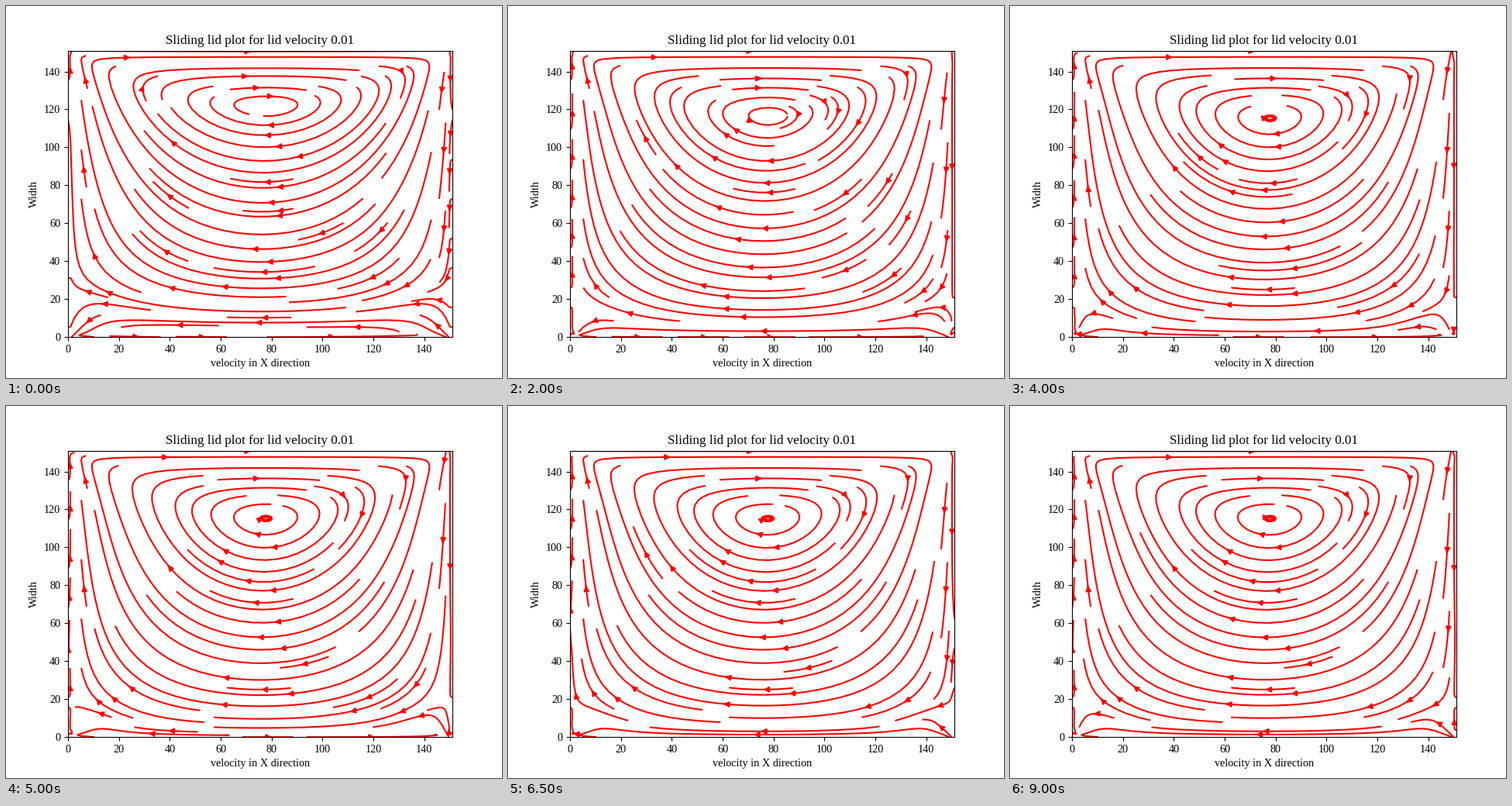
Animation, 640 px wide and 480 px high, one loop 9500 ms. Source, as a matplotlib script:

```python
import numpy as np
import matplotlib.pyplot as plt
from matplotlib.animation import ArtistAnimation

SIZE = 152            # nodes per side, dry wall nodes included
PAD = SIZE + 2        # plus a periodic halo
LID = 0.01            # lid velocity in lattice units
FRAMES, STEPS = 19, 1020
WARM_UP = STEPS       # steps run before the first plotted interval
INTERVAL = 500


def lattice_flow():
    """D2Q9 lattice Boltzmann cavity with omega = 1, yields momentum fields.

    Populations are kept without their weights and as deviations from rest;
    momentum is stored three times its value.
    """
    def alloc(*shape):
        return np.zeros(shape, np.float32)

    edge = PAD + 1
    length = PAD * PAD - 2 * edge

    def shifted(f, dx=0, dy=0):
        start = edge - dx - PAD * dy
        return f.reshape(-1)[start:start + length]

    fields = alloc(5, PAD, PAD)
    moments, vel = fields[:3], fields[1:]
    rho, jx, jy, diag, anti = fields
    base = alloc(PAD, PAD)
    plus, minus = alloc(4, PAD, PAD), alloc(4, PAD, PAD)
    f1, f2, f5, f6 = plus
    f3, f4, f7, f8 = minus

    # Bounce-back: (slot streaming into the fluid, population hitting the wall)
    mid, low, high = slice(2, SIZE), slice(1, SIZE - 1), slice(3, SIZE + 1)
    last = SIZE - 1
    walls = [
        (f3[mid, SIZE], f1[mid, last]),      # right
        (f7[high, SIZE], f5[low, last]),
        (f6[low, SIZE], f8[high, last]),
        (f1[mid, 1], f3[mid, 2]),            # left
        (f5[low, 1], f7[high, 2]),
        (f8[high, 1], f6[low, 2]),
        (f2[1, mid], f4[2, mid]),            # bottom
        (f5[1, low], f7[2, high]),
        (f6[1, high], f8[2, low]),
        (f4[SIZE, mid], f2[last, mid]),      # top
        (f7[SIZE, high], f5[last, low]),
        (f8[SIZE, low], f6[last, high]),
    ]
    lid_back, lid_ahead = f7[SIZE, high], f8[SIZE, low]

    even, odd = alloc(4, length), alloc(4, length)
    dirs = [(1, 0), (0, 1), (1, 1), (-1, 1)]
    pairs = [(shifted(plus[i], dx, dy), shifted(minus[i], -dx, -dy),
              even[i], odd[i]) for i, (dx, dy) in enumerate(dirs)]
    e0, e1, e2, e3 = even
    o0, o1, o2, o3 = odd
    b, r, mx, my = (shifted(f) for f in (base, rho, jx, jy))

    for step in range(1, WARM_UP + FRAMES * STEPS + 1):
        # periodic halo
        moments[:, 0] = moments[:, -2]
        moments[:, -1] = moments[:, 1]
        moments[:, :, 0] = moments[:, :, -2]
        moments[:, :, -1] = moments[:, :, 1]

        # equilibrium
        np.add(jx, jy, out=diag)
        np.subtract(jy, jx, out=anti)
        np.multiply(vel, vel, out=plus)
        np.add(f1, f2, out=base)
        base *= -1 / 6
        base += rho
        plus *= 0.5
        plus += base
        np.subtract(plus, vel, out=minus)
        plus += vel

        for slot, hit in walls:
            np.copyto(slot, hit)
        lid_back -= 6 * LID
        lid_ahead += 6 * LID

        # streaming and new moments
        for p, m, e, o in pairs:
            np.add(p, m, out=e)
            np.subtract(p, m, out=o)
        np.multiply(b, 4, out=r)
        r += e0
        r += e1
        r *= 4
        r += e2
        r += e3
        r *= 1 / 36
        np.multiply(o0, 4, out=mx)
        mx += o2
        mx -= o3
        mx *= 1 / 12
        np.multiply(o1, 4, out=my)
        my += o2
        my += o3
        my *= 1 / 12

        if step > WARM_UP and (step - WARM_UP) % STEPS == 0:
            yield jx[1:-1, 1:-1].astype(float), jy[1:-1, 1:-1].astype(float)


plt.rcParams["font.family"] = "Liberation Serif"
plt.rcParams["font.size"] = 10.3

fig, ax = plt.subplots(figsize=(6.4, 4.8), dpi=100)
ax.set_xlim(0, SIZE - 1)
ax.set_ylim(0, SIZE - 1)
ax.set_title("Sliding lid plot for lid velocity 0.01", fontsize=12.3)
ax.set_xlabel("velocity in X direction")
ax.set_ylabel("Width")

nodes = np.arange(SIZE)
scenes = []
for u, v in lattice_flow():
    drawn = len(ax.patches)
    flow = ax.streamplot(nodes, nodes, u, v, color="red")
    scenes.append([flow.lines, *ax.patches[drawn:]])

anim = ArtistAnimation(fig, scenes, interval=INTERVAL, repeat=True,
                       repeat_delay=0, blit=False)
plt.show()
```
